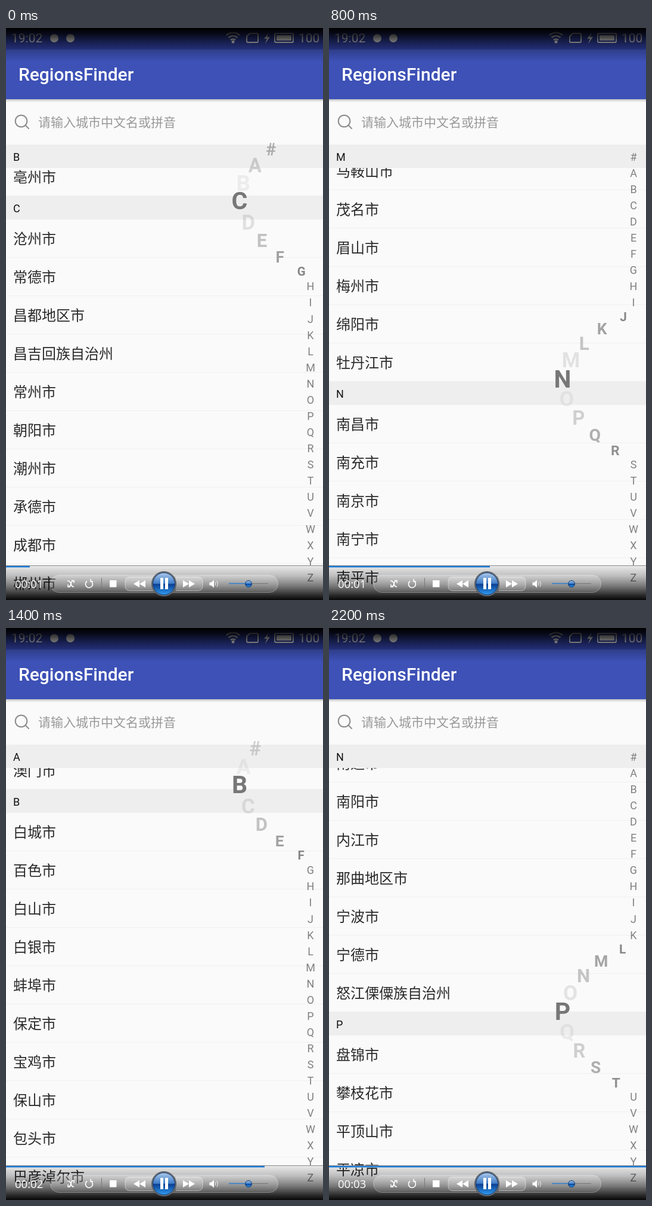
Write an HTML page that moves like this. It is 532 px wide and 956 px high and loops after 2.3 s.

```html
<!DOCTYPE html>
<html lang="zh-CN">
<head>
<meta charset="utf-8">
<title>RegionsFinder</title>
<style>
html, body { margin: 0; width: 100%; height: 100%; overflow: hidden; background: #fafafa; }
#stage { position: relative; width: 532px; height: 956px; overflow: hidden; background: #fafafa; }
#list {
  position: absolute; top: 195px; left: 0; width: 532px; height: 761px; overflow: hidden;
  font: 24px "Noto Sans CJK SC", "Noto Sans CJK", sans-serif; color: #2a2a2a;
}
#list h2 {
  position: sticky; top: 0; margin: 0; padding-left: 12px; height: 39px; background: #eee;
  font: 18px/41px Roboto, "Noto Sans CJK SC", "Noto Sans CJK", sans-serif; color: #111;
}
#list p {
  margin: 0; padding-left: 12px; height: 64px; line-height: 62px; box-sizing: border-box;
  border-bottom: 1px solid #f0f0f3; white-space: nowrap;
}
#list .here h2 { height: 56px; line-height: 58px; color: #333; }
#list .here p { height: 58px; line-height: 57px; font-size: 21px; border: 0; }
#list .hot h2 { height: 54px; line-height: 56px; color: #333; }
.grid { display: grid; grid-template-columns: 179px 179px 1fr; grid-auto-rows: 62.5px; height: 250px; }
.grid span { padding-left: 12px; line-height: 62px; }
svg { position: absolute; left: 0; top: 0; }
#index { font-family: Roboto, sans-serif; text-anchor: middle; }
</style>
</head>
<body>
<div id="stage">
  <div id="list"></div>
  <svg id="index" width="532" height="956"></svg>
  <svg width="532" height="956">
    <defs>
      <linearGradient id="status" x2="0" y2="1">
        <stop offset="0" stop-color="#000"/>
        <stop offset=".14" stop-color="#000" stop-opacity=".88"/>
        <stop offset=".43" stop-color="#000" stop-opacity=".5"/>
        <stop offset=".65" stop-color="#000" stop-opacity=".24"/>
        <stop offset="1" stop-color="#000" stop-opacity="0"/>
      </linearGradient>
      <linearGradient id="shade" x2="0" y2="1">
        <stop offset="0" stop-opacity=".1"/>
        <stop offset=".25" stop-opacity=".24"/>
        <stop offset=".55" stop-opacity=".5"/>
        <stop offset=".9" stop-opacity=".88"/>
        <stop offset="1" stop-opacity=".97"/>
      </linearGradient>
      <linearGradient id="drop" x2="0" y2="1">
        <stop offset="0" stop-opacity=".22"/>
        <stop offset="1" stop-opacity="0"/>
      </linearGradient>
      <linearGradient id="glass" x2="0" y2="1">
        <stop offset="0" stop-color="#fff" stop-opacity=".26"/>
        <stop offset="1" stop-color="#fff" stop-opacity=".12"/>
      </linearGradient>
      <linearGradient id="ball" x2="0" y2="1">
        <stop offset="0" stop-color="#a9c8ea"/>
        <stop offset=".48" stop-color="#3f7cc8"/>
        <stop offset=".52" stop-color="#0b3f93"/>
        <stop offset="1" stop-color="#2f9cf0"/>
      </linearGradient>
    </defs>

    <!-- status bar and app bar -->
    <rect width="532" height="119" fill="#3d51b6"/>
    <rect width="532" height="36" fill="#303f9f"/>
    <g fill="#eee" font-family="Roboto, sans-serif" font-size="21">
      <text x="9" y="24">19:02</text>
      <text x="491" y="24">100</text>
      <circle cx="81" cy="17" r="7"/>
      <circle cx="108" cy="17" r="7"/>
      <path d="M441 8l-8 10h5l-3 8 8-11h-5z"/>
      <rect x="454" y="12" width="25" height="9"/>
      <circle cx="381" cy="23" r="2.5"/>
    </g>
    <g fill="none" stroke="#eee" stroke-width="2">
      <path d="M370 12q11-9 22 0M373.500 16q7.500-6 15 0M377 20q4-3 8 0" stroke-width="2.500"/>
      <path d="M409 9h12q2 0 2 2v11q0 2-2 2h-15q-2 0-2-2v-8z"/>
      <rect x="451" y="9" width="31" height="15" rx="2"/>
    </g>
    <rect width="532" height="56" fill="url(#status)"/>
    <rect y="119" width="532" height="5" fill="url(#drop)"/>
    <text x="21" y="88" font-family="Roboto, sans-serif" font-size="30" font-weight="500" fill="#fff">RegionsFinder</text>

    <!-- search box -->
    <g fill="none" stroke="#8c8c8c" stroke-width="2" stroke-linecap="round">
      <circle cx="25.500" cy="155.500" r="9.800"/>
      <path d="M32.500 162.500l5.500 5.500"/>
    </g>
    <text x="54" y="165" font-family="Noto Sans CJK SC, Noto Sans CJK, sans-serif" font-size="21" fill="#999">请输入城市中文名或拼音</text>

    <!-- player -->
    <rect y="902" width="532" height="54" fill="url(#shade)"/>
    <rect y="898" width="532" height="4" fill="#e4e4e4"/>
    <rect y="898" width="532" height="1" fill="#8d8d8d"/>
    <rect id="played" y="899" height="2.500" fill="#1c7ad6"/>
    <text id="clock" x="15" y="936" font-family="Open Sans, sans-serif" font-size="18.500" fill="#fff"></text>
    <g fill="url(#glass)" stroke="#fff" stroke-opacity=".3">
      <rect x="74.500" y="914.500" width="382" height="29" rx="14.500"/>
      <path d="M247 917.500h-39q-8 0-8 8v7q0 8 8 8h39M285 917.500h37q8 0 8 8v7q0 8-8 8h-37" stroke-opacity=".45"/>
    </g>
    <path d="M160.500 919v20" stroke="#777"/>
    <g fill="none" stroke="#fff" stroke-width="1.600">
      <path d="M103 924q5 0 6 5t5 5M104 934q4 0 5-5t4-5M110 923.500h4v4M104 930v4h4"/>
      <path d="M136 924.500a6 6 0 1 0 6-.5M142 921v4h4"/>
      <path d="M351 926q2 3 0 6M354 924q3 5 0 10" stroke-width="1" stroke-opacity=".8"/>
    </g>
    <g fill="#fff">
      <rect x="174" y="923" width="11.500" height="11.500"/>
      <path d="M224 923v12l-10-6zM234 923v12l-10-6zM297 923v12l10-6zM307 923v12l10-6z"/>
      <path d="M341.500 926.500h3l4.500-4v13l-4.500-4h-3z"/>
    </g>
    <path d="M374 928.500h66" stroke="#777"/>
    <path d="M374 928.500h33" stroke="#2b7fd0" stroke-width="1.500"/>
    <circle cx="407" cy="929" r="5.500" fill="url(#ball)" stroke="#173f70"/>
    <circle cx="265" cy="929" r="20.500" fill="#737b85" stroke="#4c525a"/>
    <circle cx="265" cy="929" r="18.500" fill="url(#ball)" stroke="#15305c"/>
    <path d="M259 919h5v19h-5zM267 919h5v19h-5z" fill="#fff"/>
  </svg>
</div>

<script>
const LOOP = 2300, STEP = 100;
const LETTERS = '#ABCDEFGHIJKLMNOPQRSTUVWXYZ';
const LIST_TOP = 195, FIRST_Y = 215.5, PITCH = 27.06, INDEX_X = 511;

const CITIES = {
  A: '阿坝藏族羌族自治州 阿克苏地区 阿拉尔 阿拉善盟 阿勒泰地区 阿里地区 安康 安庆 鞍山 安顺 安阳 澳门',
  B: '白城 百色 白山 白银 蚌埠 保定 宝鸡 保山 包头 巴彦淖尔 巴音郭楞蒙古自治州 巴中 北海 北京 本溪 毕节 滨州 亳州',
  C: '沧州 常德 昌都地区 昌吉回族自治州 常州 朝阳 潮州 承德 成都 郴州 长春 长沙 长治 赤峰 池州 崇左 重庆 滁州 楚雄彝族自治州',
  D: '大理白族自治州 大连 大庆 大同 达州 丹东 德阳 德州 定西 东莞 东营',
  E: '鄂尔多斯 恩施土家族苗族自治州 鄂州',
  F: '防城港 佛山 抚顺 阜新 阜阳 抚州 福州',
  G: '赣州 甘南藏族自治州 广安 广元 广州 贵港 桂林 贵阳 固原',
  H: '哈尔滨 海口 邯郸 汉中 杭州 鹤壁 河池 合肥 鹤岗 衡水 衡阳 河源 菏泽 怀化 淮安 黄山 惠州 湖州',
  J: '吉安 江门 焦作 嘉兴 揭阳 吉林 济南 金华 济宁 荆门 荆州 九江 酒泉 鸡西',
  K: '开封 喀什地区 克拉玛依 昆明',
  L: '来宾 莱芜 廊坊 兰州 拉萨 乐山 连云港 聊城 丽江 临沂 林芝地区 柳州 洛阳 泸州 吕梁',
  M: '马鞍山 茂名 眉山 梅州 绵阳 牡丹江',
  N: '南昌 南充 南京 南宁 南平 南通 南阳 内江 那曲地区 宁波 宁德 怒江傈僳族自治州',
  P: '盘锦 攀枝花 平顶山 平凉 萍乡 莆田 濮阳',
  Q: '潜江 青岛 庆阳 清远 秦皇岛 钦州 琼海 齐齐哈尔 七台河 泉州 曲靖 衢州',
  R: '日喀则地区 日照',
  S: '三门峡 三明 三亚 上海 商洛 商丘 上饶 汕头 韶关 绍兴 深圳 沈阳 十堰 苏州',
  T: '泰安 台州 太原 泰州 唐山 天津 天水 铁岭 通化 铜陵',
  W: '潍坊 威海 渭南 温州 武汉 芜湖 无锡 梧州',
  X: '厦门 西安 襄阳 咸阳 邢台 西宁 徐州',
  Y: '雅安 延安 盐城 扬州 烟台 宜宾 宜昌 银川',
  Z: '枣庄 张家口 湛江 郑州 镇江 中山 珠海 淄博 遵义'
};
const HOT = '上海 北京 广州 深圳 武汉 天津 西安 南京 杭州 成都 重庆';

// Monotone cubic through [x, y] points, clamped at both ends
function curve(pts) {
  const rise = pts.slice(1).map((p, i) => (p[1] - pts[i][1]) / (p[0] - pts[i][0]));
  const slope = pts.map((_, i) => {
    const a = rise[i - 1] ?? rise[i], b = rise[i] ?? a;
    return a * b <= 0 ? 0 : 2 * a * b / (a + b);
  });
  return x => {
    if (x <= pts[0][0]) return pts[0][1];
    const j = pts.findIndex(p => p[0] >= x);
    if (j < 0) return pts[pts.length - 1][1];
    const [x0, y0] = pts[j - 1], [x1, y1] = pts[j], w = x1 - x0, u = (x - x0) / w, v = 1 - u;
    return v * v * ((1 + 2 * u) * y0 + u * w * slope[j - 1])
         + u * u * ((1 + 2 * v) * y1 - v * w * slope[j]);
  };
}

// Finger height, and the height of the chosen section's header trailing it
const touchAt = curve([[0, 290.4], [500, 307.2], [800, 599.4], [1100, 702.4],
  [1400, 263.8], [1800, 192], [2200, 652.4]]);
const headAt = curve([[0, 281], [500, 298], [800, 591], [1100, 693],
  [1400, 270], [1800, LIST_TOP], [2200, 642]]);
const playedAt = curve([[0, 40], [500, 187], [800, 270], [1100, 352], [1400, 434], [1760, 532], [2300, 532]]);
// Sideways push of a letter by its distance from the finger
const PEAK = 119, REACH = 126;
const pushAt = curve([[0, PEAK], [20, 113], [35, 103], [48, 93], [64, 78], [75, 66], [91, 47], [114, 16], [REACH, 0]]);

const $ = id => document.getElementById(id);
const list = $('list'), sections = {};

function addSection(key, title, body, cls = '') {
  const el = document.createElement('section');
  el.className = cls;
  el.innerHTML = `<h2>${title}</h2>${body}`;
  list.append(el);
  sections[key] = el;
}

const fullName = n => n.endsWith('自治州') ? n : n + '市';
addSection('#', '定位城市', '<p>北京</p>', 'here');
addSection('hot', '热门城市', `<div class="grid">${HOT.split(' ').map(n => `<span>${n}</span>`).join('')}</div>`, 'hot');
for (const [key, names] of Object.entries(CITIES))
  addSection(key, key, names.split(' ').map(n => `<p>${fullName(n)}</p>`).join(''));

const marks = [...LETTERS].map(ch => {
  const el = document.createElementNS('http://www.w3.org/2000/svg', 'text');
  el.textContent = ch;
  $('index').append(el);
  return el;
});

function drawIndex(touch, chosen) {
  marks.forEach((el, i) => {
    const y = FIRST_Y + i * PITCH, d = y - touch, dist = Math.abs(d);
    const top = i === chosen && i > 0, near = dist < REACH;
    const push = top ? PEAK : pushAt(dist);
    const lift = top || !near ? 0 : Math.sign(d) * 9 * Math.sin(Math.PI * dist / REACH);
    el.setAttribute('x', INDEX_X - push);
    el.setAttribute('y', y + 6.4 + lift);
    el.setAttribute('font-size', top ? 41 : 18 + 0.16 * push);
    el.setAttribute('font-weight', near ? 700 : 400);
    el.setAttribute('fill', i === chosen ? '#777' : '#808080');
    el.setAttribute('fill-opacity', i === chosen ? 1 : 1 - (push / 122) ** 1.5);
  });
}

// Letters without a section fall back to the one before
function scrollList(head, chosen) {
  let i = chosen;
  while (!sections[LETTERS[i]]) i--;
  list.scrollTop = Math.round(sections[LETTERS[i]].offsetTop - (head - LIST_TOP));
}

function draw(t) {
  const touch = touchAt(t);
  const chosen = Math.min(26, Math.max(0, Math.round((touch - FIRST_Y) / PITCH)));
  scrollList(headAt(t), chosen);
  drawIndex(touch, chosen);
  $('played').setAttribute('width', playedAt(t));
  $('clock').textContent = '00:0' + (1 + Math.floor(t / 900));
}

const start = performance.now();
function tick() {
  const t = (performance.now() - start) % LOOP;
  draw(Math.floor(t / STEP) * STEP);
  requestAnimationFrame(tick);
}
tick();
</script>
</body>
</html>
```
